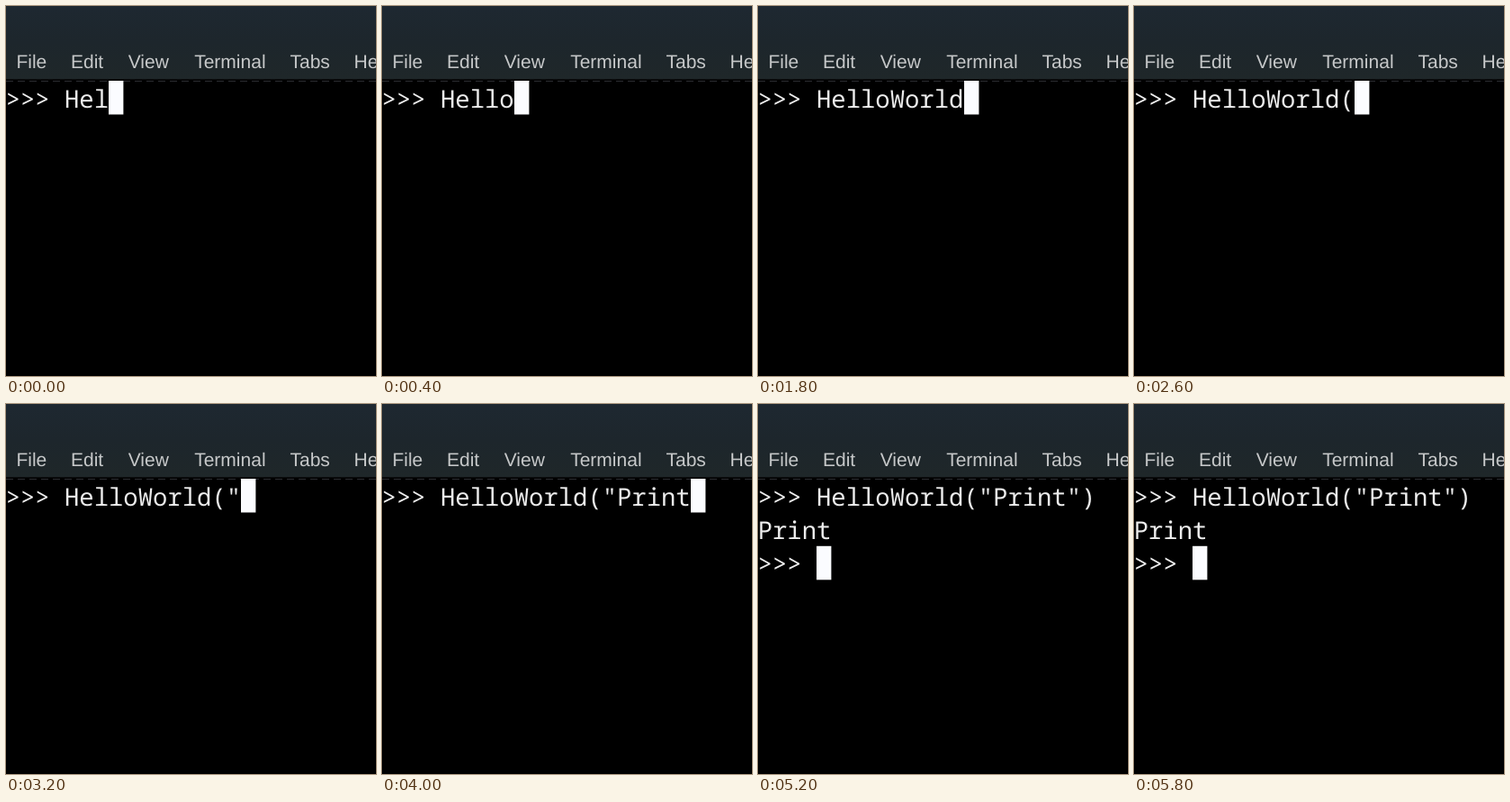
An HTML page that plays this animation: 411x411 px, repeating every 6 s.

```html
<!DOCTYPE html>
<html lang="en">
<head>
<meta charset="utf-8">
<title>Terminal</title>
<style>
  html, body { margin: 0; width: 100%; height: 100%; overflow: hidden; background: #000; }
  svg { display: block; width: 411px; height: 411px; }
  text { white-space: pre; text-rendering: geometricPrecision; }
  .menu { font: 21px "Liberation Sans", Arial, sans-serif; fill: #c6c8c9; }
  .shell { font: 27.22px "Noto Sans Mono", "DejaVu Sans Mono", monospace; fill: #ececec; }
</style>
</head>
<body>
<svg viewBox="0 0 411 411">
  <defs>
    <linearGradient id="bar" x2="0" y2="1">
      <stop offset="0" stop-color="#1e2831"/>
      <stop offset=".5" stop-color="#1d262c"/>
      <stop offset="1" stop-color="#1f2729"/>
    </linearGradient>
  </defs>
  <rect width="411" height="411"/>
  <rect width="411" height="81" fill="url(#bar)"/>
  <rect y="81" width="411" height="1" fill="#0c0e0f"/>
  <path d="M0 83.5H411" stroke="#2b2c31" stroke-dasharray="8 5"/>
  <g class="menu">
    <text x="11.4" y="69">File</text>
    <text x="72" y="69">Edit</text>
    <text x="135.7" y="69">View</text>
    <text x="209.2" y="69">Terminal</text>
    <text x="315.5" y="69">Tabs</text>
    <text x="386.5" y="69">Help</text>
  </g>
  <g class="shell">
    <text id="input" x="-0.3" y="112.6"></text>
    <g id="output">
      <text x="-0.3" y="149.9">Print</text>
      <text x="-0.3" y="187.2">&gt;&gt;&gt; </text>
    </g>
  </g>
  <rect id="cursor" width="16.4" height="37.5" fill="#fbfcff"/>
</svg>
<script>
  const LOOP = 6000, ADVANCE = 16.33, ROW = 37.4, ENTER = 5200;
  const command = 'HelloWorld("Print")', start = 3;
  // Time of each key press after the first three letters
  const keys = [200, 400, 800, 1200, 1400, 1600, 1800, 2400, 2800,
                3400, 3600, 3800, 3800, 4000, 4400, 4600];
  const [input, output, cursor] = ['input', 'output', 'cursor'].map(id => document.getElementById(id));

  function draw() {
    const t = performance.now() % LOOP;
    const typed = start + keys.filter(k => k <= t).length;
    const done = t >= ENTER;
    input.textContent = '>>> ' + command.slice(0, typed);
    output.style.display = done ? '' : 'none';
    cursor.setAttribute('x', Math.round(ADVANCE * (4 + (done ? 0 : typed))));
    cursor.setAttribute('y', 83 + (done ? 2 * ROW : 0));
    requestAnimationFrame(draw);
  }
  draw();
</script>
</body>
</html>
```
